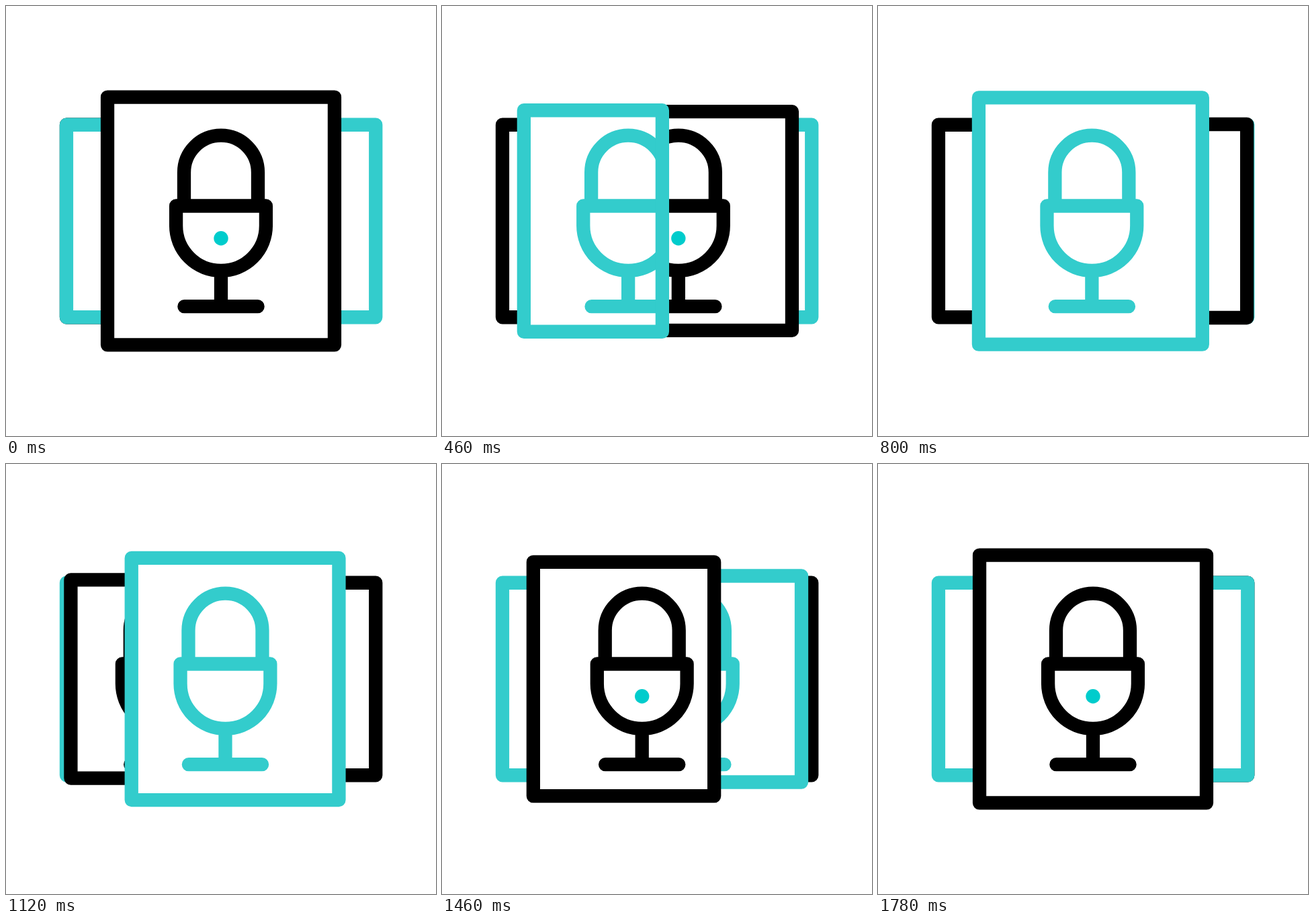
Recreate the animation shown at these times as an HTML page with a canvas. Size 640 by 640 pixels, loop 1800 ms.

```html
<!DOCTYPE html>
<html lang="en">
<head>
<meta charset="utf-8">
<title>Microphone cards</title>
<style>
  html, body { margin: 0; width: 100%; height: 100%; overflow: hidden; background: #fff; }
  canvas { display: block; width: 100vmin; height: 100vmin; }
</style>
</head>
<body>
<canvas id="stage" width="640" height="640"></canvas>
<script>
const ctx = document.getElementById('stage').getContext('2d');
const LOOP = 1800, HALF = 900, STEP = 20;
const BLACK = '#000', TEAL = '#33cccc', DOT = '#00cccc';
const LINE = 20.3;

// Outer edges of a card at the side and in the middle, plus its mic centre
const LEFT   = { x0: 79.8,  x1: 162,   y0: 166.6, y1: 473.4, mic: 230.3 };
const MIDDLE = { x0: 140.9, x1: 499.1, y0: 125.4, y1: 514.6, mic: 320 };
const RIGHT  = { x0: 478,   x1: 560.4, y0: 166.6, y1: 473.4, mic: 381 };

const mix = (a, b, p) =>
  Object.fromEntries(Object.keys(a).map(k => [k, a[k] + (b[k] - a[k]) * p]));

// cubic-bezier(.5, 0, .5, 1)
function ease(x) {
  if (x <= 0) return 0;
  if (x >= 1) return 1;
  let lo = 0, hi = 1;
  for (let i = 0; i < 30; i++) {
    const u = (lo + hi) / 2;
    if (1.5 * u * (1 - u) + u ** 3 < x) lo = u; else hi = u;
  }
  return lo * lo * (3 - 2 * lo);
}

function drawMic(cx, color) {
  ctx.save();
  ctx.translate(cx, 0);
  ctx.beginPath();
  // head
  ctx.moveTo(-55, 297.5);
  ctx.lineTo(-55, 247.7);
  ctx.arc(0, 247.7, 55, Math.PI, 0);
  ctx.lineTo(55, 297.5);
  // bowl
  ctx.moveTo(-66.9, 297.5);
  ctx.lineTo(66.9, 297.5);
  ctx.lineTo(66.9, 327.1);
  ctx.arc(0, 327.1, 66.9, 0, Math.PI);
  ctx.closePath();
  // stem and foot
  ctx.moveTo(0, 394);
  ctx.lineTo(0, 447.2);
  ctx.moveTo(-54.6, 447.2);
  ctx.lineTo(54.6, 447.2);
  ctx.stroke();
  if (color === BLACK) {
    ctx.fillStyle = DOT;
    ctx.beginPath();
    ctx.arc(0, 345.8, 10.7, 0, Math.PI * 2);
    ctx.fill();
  }
  ctx.restore();
}

function drawCard(card, color, withMic) {
  const { x0, x1, y0, y1, mic } = card;
  const w = x1 - x0, h = y1 - y0;
  ctx.fillStyle = '#fff';
  ctx.fillRect(x0 + LINE / 2, y0 + LINE / 2, w - LINE, h - LINE);
  ctx.strokeStyle = color;
  if (withMic) {
    ctx.save();
    ctx.beginPath();
    ctx.rect(x0 + LINE / 2, y0, w - LINE, h);
    ctx.clip();
    drawMic(mic, color);
    ctx.restore();
  }
  ctx.strokeRect(x0 + LINE / 2, y0 + LINE / 2, w - LINE, h - LINE);
}

function draw(time) {
  const t = Math.floor((time % LOOP) / STEP) * STEP;
  const first = t < HALF;
  const p = first ? ease(t / HALF) : ease((t - HALF) / (HALF - STEP));
  const leaving = first ? BLACK : TEAL;
  const coming = first ? TEAL : BLACK;

  ctx.fillStyle = '#fff';
  ctx.fillRect(0, 0, 640, 640);
  ctx.lineWidth = LINE;
  ctx.lineCap = ctx.lineJoin = 'round';

  drawCard(LEFT, leaving, false);
  drawCard(RIGHT, coming, false);
  const pair = [
    [mix(LEFT, MIDDLE, p), coming, true],
    [mix(MIDDLE, RIGHT, p), leaving, true]
  ];
  if (p >= 0.5) pair.reverse();
  pair.forEach(args => drawCard(...args));
}

const start = performance.now();
function tick() {
  draw(performance.now() - start);
  requestAnimationFrame(tick);
}
tick();
</script>
</body>
</html>
```
